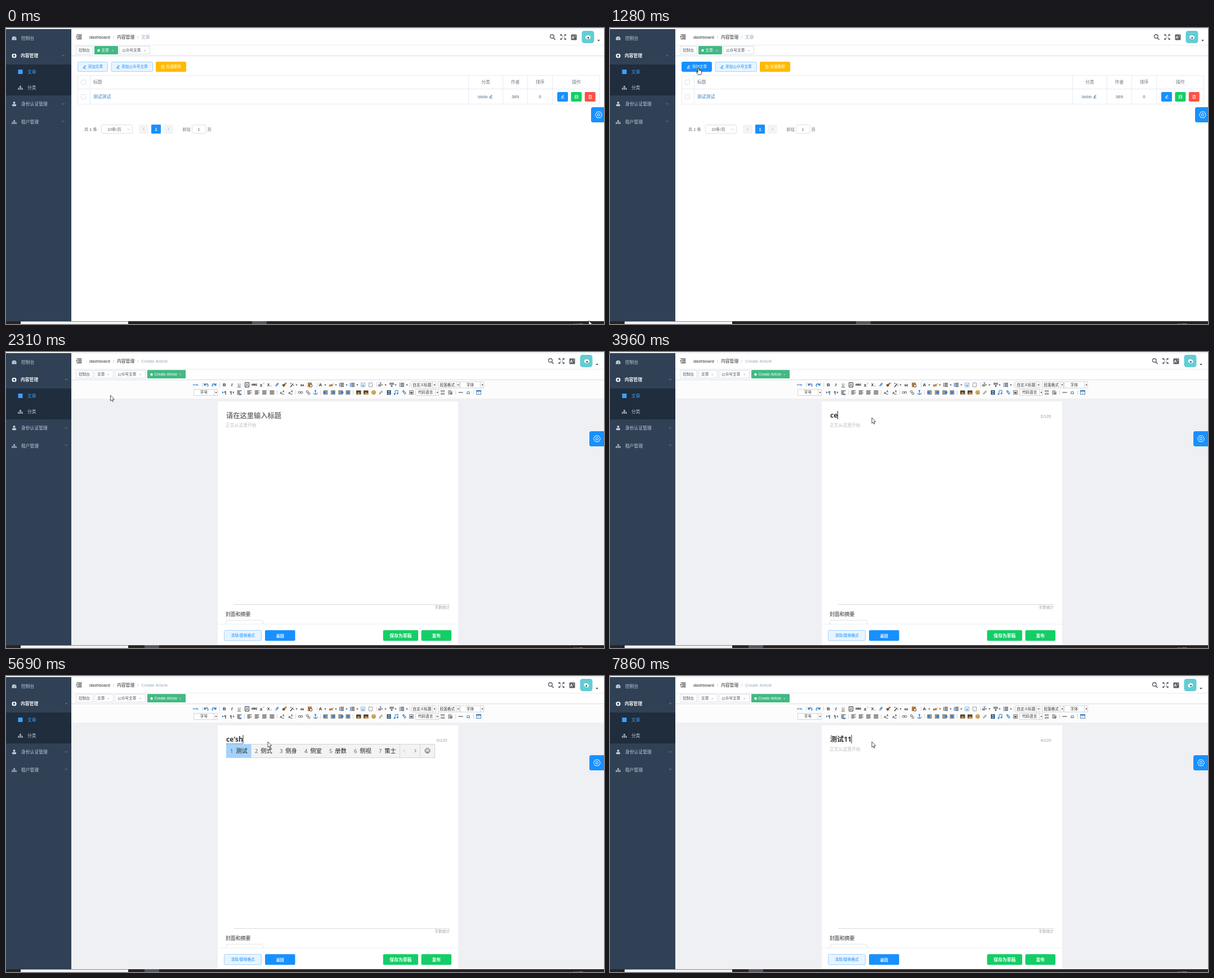
An HTML page with a canvas for the animation above (8 s loop, 1062 by 527 pixels).

```html
<!DOCTYPE html>
<html lang="zh">
<head>
<meta charset="utf-8">
<title>文章</title>
<style>
html, body { margin: 0; width: 100%; height: 100%; overflow: hidden; background: #fff; }
canvas { display: block; }
</style>
</head>
<body>
<canvas id="stage" width="1062" height="527"></canvas>
<script>
const c = document.getElementById('stage').getContext('2d');
const LOOP = 8000;
const SANS = '"Liberation Sans","Noto Sans CJK SC","Noto Sans CJK JP",sans-serif';
const OPEN = '"Open Sans","Noto Sans CJK SC","Noto Sans CJK JP",sans-serif';
const BLUE = '#1890ff', GREEN = '#13ce66', INK = '#303133', MUTED = '#606266';

// ---- helpers ----
function box(x, y, w, h, fill, stroke, r = 0) {
  c.beginPath();
  if (stroke) c.roundRect(x + .5, y + .5, w - 1, h - 1, r); else c.roundRect(x, y, w, h, r);
  if (fill) { c.fillStyle = fill; c.fill(); }
  if (stroke) { c.strokeStyle = stroke; c.lineWidth = 1; c.stroke(); }
}
function line(color, width, ...p) {
  c.beginPath();
  for (let i = 0; i < p.length; i += 2) c.lineTo(p[i], p[i + 1]);
  c.strokeStyle = color; c.lineWidth = width; c.stroke();
}
function poly(fill, ...p) {
  c.beginPath();
  for (let i = 0; i < p.length; i += 2) c.lineTo(p[i], p[i + 1]);
  c.closePath(); c.fillStyle = fill; c.fill();
}
function disc(x, y, r, fill, stroke, w = 1) {
  c.beginPath(); c.arc(x, y, r, 0, 7);
  if (fill) { c.fillStyle = fill; c.fill(); }
  if (stroke) { c.strokeStyle = stroke; c.lineWidth = w; c.stroke(); }
}
// Text centred vertically on y
function text(s, x, y, size, color, align = 'left', style = '', font = SANS) {
  c.font = `${style} ${size}px ${font}`;
  c.textAlign = align; c.fillStyle = color;
  c.fillText(s, x, y + size * .37);
  return c.measureText(s).width;
}
const mid = (s, x, y, size, color, style) => text(s, x, y, size, color, 'center', style);
const chevron = (x, y, dy, color) => line(color, .8, x - 2.2, y - dy, x, y + dy, x + 2.2, y - dy);
const arrowDown = (x, y, color = '#333', r = 1.8) => poly(color, x - r, y - r / 2, x + r, y - r / 2, x, y + r / 2 + .6);
function pencil(x, y, color) {
  line(color, 1, x - 2, y + 1.4, x + 1, y - 2.4, x + 2.2, y - 1.4, x - .8, y + 2, x - 2, y + 1.4);
  line(color, .8, x - 2.6, y + 3, x + 3, y + 3);
}
function trash(x, y, color) {
  line(color, .8, x - 3, y - 2, x + 3, y - 2);
  line(color, .8, x - 2.1, y - 2, x - 2.1, y + 3, x + 2.1, y + 3, x + 2.1, y - 2);
  line(color, .8, x - 1, y - 3, x + 1, y - 3);
  line(color, .8, x, y - .5, x, y + 1.8);
}
function tree(x, y, color) {
  c.fillStyle = color;
  c.fillRect(x - 1.2, y - 3.5, 2.4, 2.4);
  for (const d of [-3.2, 0, 3.2]) c.fillRect(x + d - 1.1, y + 1, 2.2, 2.2);
  line(color, .7, x - 3.2, y + 1, x - 3.2, y, x + 3.2, y, x + 3.2, y + 1);
  line(color, .7, x, y - 1, x, y + 1);
}

// ---- frame around the page ----
function sidebar(opened) {
  const pale = '#bfcbd9', x = opened ? 107 : 101.5;
  box(0, 2, 116, 520, '#304156');
  box(0, 65, 116, 55, '#1f2d3d');
  c.beginPath(); c.arc(14.5, 19, 4, Math.PI, 0); c.lineTo(18.5, 21.5); c.lineTo(10.5, 21.5);
  c.fillStyle = pale; c.fill();
  line('#304156', .8, 14.5, 20, 16, 17);
  text('控制台', 27, 18, 7.8, pale);
  disc(14.5, 49.5, 2.9, null, '#f4f4f5', 2.4);
  line('#304156', .6, 14.5, 45, 14.5, 47); line('#304156', .6, 14.5, 52, 14.5, 54);
  text('内容管理', 26, 49, 7.8, '#f4f4f5', 'left', 'bold');
  chevron(x, 49, -1, '#8795a5');
  box(21.5, 74, 8, 8, '#409eff');
  text('文章', 38, 78.5, 7.8, '#409eff');
  tree(25.5, 106.5, pale); text('分类', 38, 106.5, 7.8, pale);
  disc(14.5, 133, 2, pale);
  c.beginPath(); c.roundRect(10.8, 135.4, 7.4, 3.8, 1.8); c.fillStyle = pale; c.fill();
  text('身份认证管理', 27, 135.5, 7.8, pale);
  chevron(x, 135, 1, '#8795a5');
  tree(14.5, 167.5, pale); text('租户管理', 27, 167, 7.8, pale);
  chevron(x, 166, 1, '#8795a5');
}

function avatar(x, step) {
  box(x, 5, 22, 22, '#62cdd4', null, 4.5);
  c.save();
  c.translate(x + 11 + Math.sin(step * 2.1), 16.5);
  c.rotate(Math.sin(step * 1.7) * .5);
  c.beginPath(); c.ellipse(0, 0, 4.6, 3.4, 0, 0, 7); c.fillStyle = '#f4fafa'; c.fill();
  disc(.5, 1, 1.4, '#2c3f46');
  c.restore();
}

function header(opened, shift, step) {
  box(116, 2, 946, 48, '#fff');
  for (let i = 0; i < 4; i++) line('#222', 1.1, i % 3 ? 128 : 125.5, 12.2 + i * 2.4, 134.5, 12.2 + i * 2.4);
  poly('#222', 125.3, 13.7, 125.3, 17.8, 127.4, 15.8);
  text('dashboard', 148, 16, 7.8, INK);
  text('/', 190, 16, 7.8, '#b0b5bf');
  text('内容管理', 197, 16, 7.8, INK);
  text('/', 233, 16, 7.8, '#b0b5bf');
  text(opened ? 'Create Article' : '文章', 240, 16, 7.8, '#97a8be');

  c.save(); c.translate(-shift, 0);
  disc(969.8, 15, 3.3, null, '#5a5e66', 1.4);
  line('#5a5e66', 1.7, 972, 17.5, 975.5, 21);
  for (const sx of [-1, 1]) for (const sy of [-1, 1]) {
    const px = 989.5 + sx * 5, py = 16 + sy * 5;
    poly('#5a5e66', px, py, px - sx * 3.4, py, px, py - sy * 3.4);
    line('#5a5e66', 1.2, px, py, px - sx * 3.8, py - sy * 3.8);
  }
  box(1003.5, 11.5, 10, 10, '#5a5e66', null, 1);
  text('A', 1004.6, 16.8, 7, '#fff', 'left', 'bold');
  text('x', 1010, 14, 4.5, '#fff');
  avatar(1022.5, step);
  arrowDown(1052.5, 22, '#444', 2.2);
  c.restore();

  line('#e9ebf0', 1, 116, 30.5, 1062, 30.5);
  line('#d8dce5', 1, 116, 49.5, 1062, 49.5);
  const tabs = opened
    ? [[124, 31, '控制台'], [157, 34, '文章'], [193, 55, '公众号文章'], [251, 68, 'Create Article', 1]]
    : [[124, 31, '控制台'], [157, 42, '文章', 1], [201, 55, '公众号文章']];
  tabs.forEach(([x, w, label, on], i) => {
    box(x, 32, w, 15, on ? '#42b983' : '#fff', on ? '#42b983' : '#d8dce5');
    if (on) disc(x + 7.5, 40, 2.2, '#fff');
    text(label, x + (on ? 12.5 : 5), 39.8, 6.7, on ? '#fff' : '#495060');
    if (i) mid('×', x + w - 9.5, 40, 5.5, on ? '#fff' : '#7d8592');
  });
}

function taskbar(opened) {
  box(0, 522, 1062, 5, '#2a2322');
  box(26, 522.5, 191, 4.5, '#f3f3f3');
  box(opened ? 246 : 437, 522, 26, 5, '#56565b');
  text('14:32', 1008, 528.5, 6.5, '#e8e8e8');
}

function settings(shift) {
  const x = 1052.5 - shift, hex = [];
  box(1039 - shift, 141, 30, 27, BLUE, null, 3.5);
  for (let i = 0; i < 7; i++) hex.push(x + 6 * Math.cos(i * Math.PI / 3), 154.5 + 6 * Math.sin(i * Math.PI / 3));
  line('#fff', 1, ...hex);
  disc(x, 154.5, 2.2, null, '#fff', 1);
}

// ---- article list ----
function list(hover) {
  const edge = '#e6ebf2';
  box(127, 60, 54, 18, hover ? BLUE : '#e8f4ff', hover ? BLUE : '#a3d3ff', 2);
  pencil(139.5, 69, hover ? '#fff' : BLUE);
  text('添加文章', 145.5, 69, 6.7, hover ? '#fff' : BLUE);
  box(186.5, 60, 74.5, 18, '#e8f4ff', '#a3d3ff', 2);
  pencil(199, 69, BLUE); text('添加公众号文章', 205, 69, 6.7, BLUE);
  box(266, 60, 54, 18, '#ffba00', null, 2);
  trash(278.5, 69, '#fff'); text('批量删除', 284.5, 69, 6.7, '#fff');

  box(127, 84, 928, 52, '#fff', edge);
  line(edge, 1, 127, 108.5, 1055, 108.5);
  for (const x of [149.5, 821.5, 882.5, 926.5, 970.5]) line(edge, 1, x, 84, x, 136);
  for (const y of [92, 118]) box(133, y, 9, 9, '#fff', '#dcdfe6', 1);
  text('标题', 155, 96.5, 7.8, '#6f7680');
  [['分类', 852], ['作者', 904.5], ['排序', 948.5], ['操作', 1013]].forEach(([s, x]) => mid(s, x, 96.5, 7.8, '#6f7680'));
  text('测试测试', 155, 122.5, 7.8, '#337ab7');
  text('bbbb', 838, 122.5, 7.8, '#4f7595'); pencil(861, 122, '#4f7595');
  mid('369', 904.5, 122.5, 7.8, MUTED);
  mid('0', 948.5, 122.5, 7.8, MUTED);
  [BLUE, GREEN, '#f95446'].forEach((k, i) => box(979 + i * 24.4, 114, 19, 17, k, null, 2));
  pencil(988.5, 122, '#fff');
  box(1010, 119.5, 6, 6, null, '#e8fff1');
  line('#e8fff1', .8, 1011, 122.5, 1015, 122.5);
  trash(1037.5, 122.5, '#fff');

  text('共 1 条', 139, 180, 7.3, MUTED);
  box(169, 172, 56, 16, '#fff', '#dcdfe6', 2);
  text('10条/页', 180, 180, 7.3, MUTED); chevron(217.5, 180.3, 1.1, '#b4b8c0');
  box(236, 172, 17, 16, '#f4f4f5', null, 1);
  box(258, 172, 17, 16, BLUE, null, 1);
  box(280, 172, 17, 16, '#f4f4f5', null, 1);
  line('#b4b8c0', .9, 245.5, 177.8, 243.4, 180, 245.5, 182.2);
  line('#b4b8c0', .9, 287.7, 177.8, 289.8, 180, 287.7, 182.2);
  mid('1', 266.5, 180, 7.3, '#fff', 'bold');
  text('前往', 313.5, 180, 7.3, MUTED);
  box(330, 172, 25.5, 16, '#fff', '#dcdfe6', 2);
  mid('1', 342.5, 180, 7.3, MUTED);
  text('页', 357.5, 180, 7.3, MUTED);
}

// ---- editor toolbar ----
function rows(x, y, color, widths) {
  widths.forEach((w, i) => line(color, 1, x - 4, y - 3 + i * 2, x - 4 + w, y - 3 + i * 2));
}
function picker(x, y, w, label) {
  box(x, y - 6, w, 12, '#fff', '#d4d4d6');
  line('#d4d4d6', 1, x + w - 6.5, y - 6, x + w - 6.5, y + 6);
  mid(label, x + (w - 6) / 2, y, 6.7, '#333');
  arrowDown(x + w - 3, y, '#333', 1.6);
}
function bend(x, y, d) {
  c.beginPath(); c.arc(x, y + 1, 2.8, d > 0 ? Math.PI : 0, d > 0 ? Math.PI * 2.3 : Math.PI * .7, d < 0);
  c.strokeStyle = '#3b83c4'; c.lineWidth = 1.4; c.stroke();
  poly('#3b83c4', x - d * 4.5, y - 3.5, x - d * 4.5, y + 1.5, x, y + 1);
}
function toolbar() {
  const a = 58.5, b = 72, K = '#333', B = '#2f7fd0', O = '#b87a35';
  box(116, 50, 946, 33, '#fcfcfc');
  for (const x of [348.5, 379.5, 552.5, 658.5, 717.5]) line('#d5d5d8', 1, x, a - 4, x, a + 4);
  for (const x of [423.5, 481.5, 514.5, 558.5, 616.5, 798.5, 830.5]) line('#d5d5d8', 1, x, b - 4, x, b + 4);
  mid('HTML', 337, a, 3.8, B, 'bold');
  bend(356, a, 1); bend(369, a, -1);
  mid('B', 388, a, 8, K, 'bold');
  mid('I', 401, a, 8, K, 'italic bold');
  mid('U', 414, a - .5, 7, K); line(K, .8, 411, a + 4, 417, a + 4);
  box(424, a - 4.5, 8, 9, null, K); mid('A', 428, a, 6.5, K);
  mid('ABC', 441, a, 4.8, K, 'bold'); line(K, .8, 436, a, 446, a);
  mid('X', 453, a + .5, 7, K, 'bold'); mid('2', 457.5, a - 2.5, 4, B);
  mid('X', 466, a - .5, 7, K, 'bold'); mid('2', 470.5, a + 2.5, 4, B);
  line('#5b9bd5', 3, 478.5, a + 3, 483.5, a - 3); line('#dfe9f2', 2, 478, a + 3.5, 480, a + 1.3);
  line(O, 2.4, 494, a, 498, a - 3.5); poly('#7c5630', 490, a, 494, a - 2, 496, a + 1, 493, a + 4);
  line(K, 1.2, 505, a + 4, 510, a - 2); disc(506, a - 2.5, 1.2, O); disc(511, a + 1, 1, O);
  mid('“', 526, a + 3.2, 15, K, 'bold');
  box(536, a - 4, 7, 8, O); box(539, a - 1, 5, 5, '#fff', '#555');
  mid('A', 558.5, a, 8, K, 'bold');
  mid('ab', 577, a, 6, K, 'bold'); line('#d58b32', 1.5, 575, a + 3, 582, a - 2);
  for (const x of [596, 615]) { rows(x + 2, a, K, [6, 6, 6, 6]); line(B, 1.2, x - 3.5, a - 3.5, x - 3.5, a + 3.5); }
  box(630, a - 4, 8, 8, '#eaf3fb', '#8db7dc'); mid('a', 634, a, 6, B, 'bold');
  box(644, a - 4, 7, 8, '#fff', '#999');
  rows(665, a + 3, K, [8, 5]); poly(B, 663, a - 4, 667, a - 4, 665, a - 1);
  rows(685, a, K, [8, 8]); poly(K, 683, a + 1, 687, a + 1, 685, a + 4);
  rows(705, a, K, [6, 6, 6, 6]); line(B, 1, 699.5, a - 4, 699.5, a + 4);
  for (const x of [516, 567, 586, 605, 624, 674, 692, 712]) arrowDown(x, a, K, 1.6);
  picker(720, a, 44, '自定义标题'); picker(767, a, 39, '段落格式'); picker(806, a, 43, '字体');

  picker(333, b, 43, '字号');
  poly(B, 384, b - 2, 387, b, 384, b + 2); mid('¶', 389.5, b, 7, K, 'bold');
  mid('¶', 399.5, b, 7, K, 'bold'); poly(B, 405, b - 2, 402, b, 405, b + 2);
  rows(414.5, b, K, [8, 5, 5, 8]); line(B, 1.3, 413, b + 4, 418, b + 4);
  [[8, 5, 8, 5], [8, 6, 8, 6], [8, 7, 8, 7], [8, 8, 8, 8]].forEach((w, i) => rows(432.5 + i * 13.3, b, K, w));
  for (const x of [490, 505]) { mid('A', x - 1.5, b + 1, 6, K, 'bold'); mid('A', x + 2.5, b - 2, 4.5, K, 'bold'); line(K, .8, x, b + 3, x + 4, b + 3); }
  for (const x of [521, 525]) disc(x, b, 1.8, null, '#777', 1.1);
  disc(535, b - 1.5, 1.8, null, '#777', 1.1); disc(538, b + 2, 1.8, null, '#777', 1.1);
  line(B, 1.1, 549.5, b - 3, 549.5, b + 4);
  c.beginPath(); c.arc(549.5, b, 3.5, .2, 2.9); c.stroke(); disc(549.5, b - 3, 1.2, null, B);
  [0, 3, 5, 2].forEach((d, i) => { const x = 567.5 + i * 13.3; rows(x, b, K, [8, 8, 8, 8]); box(x - 4 + d, b - 2, 4, 4, B); });
  for (const x of [626, 639]) { box(x - 4, b - 3.5, 8.5, 7, '#54402c'); poly('#e3a247', x - 3, b + 2.5, x, b - 1, x + 3.5, b + 2.5); }
  box(639, b + 1, 5, 3, '#d99a42');
  disc(653, b, 3.6, '#f0c468', '#b07c28', .8); disc(651.7, b - .8, .6, K); disc(654.3, b - .8, .6, K);
  line(K, .7, 651.5, b + 1.5, 654.5, b + 1.5);
  line('#9a9a9a', 2.2, 663, b + 3, 668, b - 3); disc(667, b - 1, 2, '#c7bba4');
  box(676.5, b - 4, 7, 8, '#2b4a70'); box(678.5, b - 3, 3, 2.5, '#8ec1f1'); box(678.5, b + .5, 3, 2.5, '#8ec1f1');
  line(B, 1, 691, b + 3, 691, b - 3, 696, b - 4, 696, b + 2); disc(690, b + 3, 1.4, B); disc(695, b + 2, 1.4, B);
  line(B, 1.1, 704, b - 3, 708.5, b + 3, 710, b + 1, 706, b - 3.5, 705, b - 1, 707.5, b + 1.5);
  box(716, b - 4, 8, 8, '#ddd', '#888'); box(718, b - 1, 4, 3, '#666');
  picker(727, b, 42, '代码语言');
  box(772, b - 4, 7, 3, null, '#777'); box(772, b + 1, 7, 3, null, '#777');
  rows(789, b, '#666', [6, 8, 8, 6]); disc(791, b + 2, 1.8, '#777');
  line(K, 1, 803.5, b, 811.5, b);
  mid('Ω', 821, b, 8, B, 'bold');
  box(835, b - 4, 9, 8, '#fff', '#5a7fa8'); box(835, b - 4, 9, 2.5, B);
  line('#a9bfd6', .7, 839.5, b - 1, 839.5, b + 4); line('#a9bfd6', .7, 835, b + 1, 844, b + 1);
}

// ---- editor ----
function candidates(words) {
  box(391, 121, 371, 25, '#f3f3f3', '#d2d2d2');
  box(391, 121, 44.5, 24.5, '#a3d3fa');
  words.forEach((w, i) => {
    const x = 398 + i * 44;
    text(i + 1, x, 133, 9.5, '#555', 'left', '', OPEN);
    text(w, x + 10.3, 133, 10.3, '#1c1c1c');
  });
  line('#d6d6d6', 1, 699.5, 122, 699.5, 145); line('#d6d6d6', 1, 735.5, 122, 735.5, 145);
  line('#b5b5b5', .8, 708.3, 130.3, 705.7, 133, 708.3, 135.7);
  line('#333', .8, 725.7, 130.3, 728.3, 133, 725.7, 135.7);
  disc(748.5, 133, 4.3, null, '#333', .9);
  disc(746.9, 131.8, .7, '#333'); disc(750.1, 131.8, .7, '#333');
  c.beginPath(); c.arc(748.5, 133.4, 2.2, .2, 2.9); c.stroke();
}
function editor(state) {
  const [, title, count, words, caret] = state;
  box(116, 50, 946, 472, '#eff0f4');
  toolbar();
  box(376, 88, 427, 434, '#fff');
  let w = 0;
  if (title) w = text(title, 391, 113, 12.1, '#333', 'left', 'bold', OPEN);
  else text('请在这里输入标题', 391, 113, 12.25, '#757575', 'left', 'bold');
  if (words) {
    c.setLineDash([1.5, 1]); line('#333', .8, 391, 120.5, 391 + w, 120.5); c.setLineDash([]);
  }
  if (caret) line('#222', 1, 391 + w, 105, 391 + w, 120);
  if (count !== null) text(count + '/120', 783.5, 114.5, 7.6, '#9a9a9a', 'right');
  text('正文从这里开始', 390, 130, 7.8, '#bdbdbd');

  line('#d9d9d9', 1, 405, 449.5, 788, 449.5);
  text('字数统计', 788, 455, 6.7, '#a0a0a0', 'right');
  text('封面和摘要', 390, 466.5, 8.9, INK);
  c.setLineDash([2, 1]); box(390, 477, 67, 20, null, '#d5d5d5', 3); c.setLineDash([]);
  box(376, 484, 427, 38, '#fff');
  line('#eceef2', 1, 376, 484.5, 803, 484.5);
  box(387, 495, 67, 19.5, '#e8f4ff', '#a3d3ff', 2);
  mid('清除/替换格式', 420.8, 505, 6.7, BLUE);
  [[460, 53.5, BLUE, '返回', 7], [669.7, 62.3, GREEN, '保存为草稿', 7.8], [737.6, 53.4, GREEN, '发布', 7.8]].forEach(([x, bw, k, s, z]) => {
    box(x, 495.3, bw, 19, k, null, 2); mid(s, x + bw / 2, 505, z, '#fff', 'bold');
  });
  if (words) candidates(words);
}

// ---- pointer ----
function arrow(x, y) {
  c.beginPath();
  for (const [px, py] of [[0, 0], [0, 10], [2.3, 8], [3.8, 11.3], [5.2, 10.6], [3.8, 7.4], [6.8, 7.2]]) c.lineTo(x + px, y + py);
  c.closePath();
  c.fillStyle = '#fff'; c.fill(); c.strokeStyle = '#222'; c.lineWidth = .8; c.stroke();
}
function hand(x, y) {
  c.beginPath();
  for (const [px, py] of [[-1, 0], [1, 0], [1.2, 4], [5.5, 5], [6, 9], [4.5, 12], [-.5, 12], [-3.5, 8], [-3, 6.6], [-1, 8]]) c.lineTo(x + px, y + py);
  c.closePath();
  c.fillStyle = '#fff'; c.fill(); c.strokeStyle = '#222'; c.lineWidth = .9; c.stroke();
}

// ---- timing ----
const steps = [0];
function addSteps(from, to, n) {
  for (let i = 0; i < n; i++) steps.push(n > 1 ? from + (to - from) * i / (n - 1) : from);
}
[[70, 1030, 8], [1280, 1770, 3], [2040, 2040, 1], [2310, 3240, 5], [3480, 4460, 5],
 [4690, 5690, 5], [5940, 6900, 5], [7140, 7860, 4]].forEach(s => addSteps(...s));

const SE = ['测试', '侧式', '侧身', '侧室', '册数', '侧视', '策士'];
const CE = ['测', '册', '侧', '策', '厕', '测试', '策略'];
const C_ = ['从', '才', '次', '错', '此', '成', '出'];
// time, title, counter, candidates, caret
const typing = [
  [0, '', null, null, 0], [3480, '', 0, null, 1], [3720, 'c', 1, null, 1], [3950, 'ce', 2, null, 1],
  [4210, 'c', 1, null, 1], [4450, '', 0, null, 1], [4930, 'c', 0, C_, 1], [5180, 'ce', 0, CE, 1],
  [5430, "ce's", 0, SE, 1], [5680, "ce'sh", 0, SE, 1], [5930, "ce'shi", 0, SE, 1],
  [6410, '测试', 2, null, 1], [6650, '测试', 2, null, 0], [6890, '测试', 2, null, 1],
  [7370, '测试1', 3, null, 1], [7610, '测试11', 4, null, 1]
];
const lastAt = (t, items, time) => items.reduce((k, it, i) => time(it) <= t + .5 ? i : k, 0);
const ease = p => p * p * (3 - 2 * p);
const mix = (a, b, p) => a + (b - a) * p;

function pointer(step) {
  if (step <= 8) {
    const p = ease(step / 8);
    return [mix(1035, 157, p), mix(521, 71, p)];
  }
  if (step <= 11) return [157, 71];
  if (step === 12) return [160.5, 71.5];
  const p = ease(Math.min(1, (step - 13) / 4));
  return [mix(185.5, 465, p), mix(77, 117, p)];
}

function draw(t) {
  const step = lastAt(t, steps, s => s);
  const opened = step >= 10, editing = step >= 13, shift = editing ? 3 : 0;
  box(0, 0, 1062, 527, '#fff');
  line('#dfe1e4', 1, 0, 1.5, 1062, 1.5);
  if (editing) editor(typing[lastAt(t, typing, s => s[0])]);
  else if (step <= 10) {
    c.save();
    if (opened) { c.globalAlpha = .35; c.translate(12, 0); }
    list(step >= 8);
    c.restore();
  }
  header(opened, shift, step);
  sidebar(opened);
  settings(shift);
  taskbar(opened);
  const [x, y] = pointer(step);
  (step >= 8 && step <= 10 ? hand : arrow)(x, y);
}
function tick() {
  draw(performance.now() % LOOP);
  requestAnimationFrame(tick);
}
tick();
</script>
</body>
</html>
```
